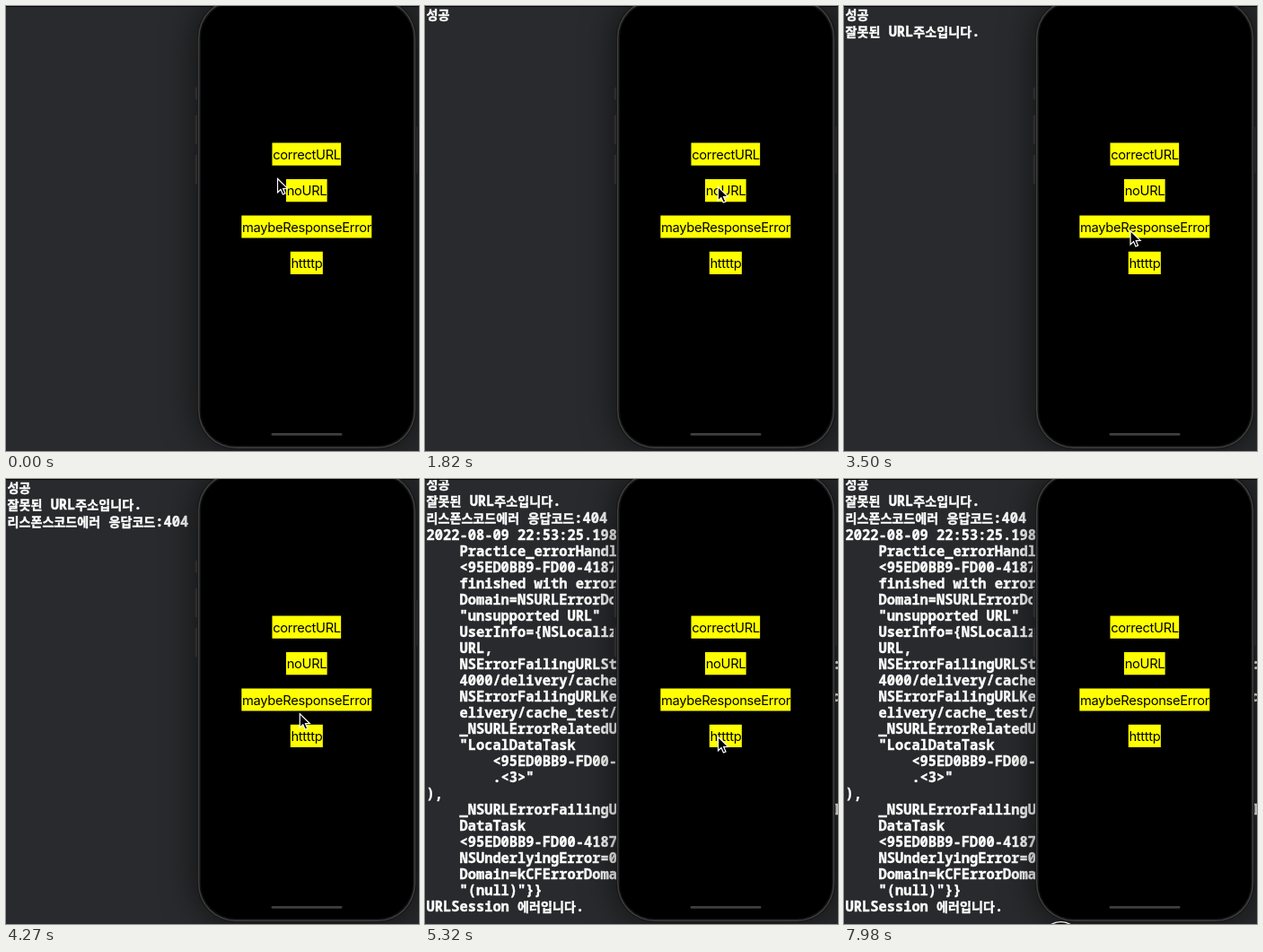
Animation, 460 px wide and 496 px high, one loop 8.12 s. Source, as an HTML page with a canvas:

```html
<!DOCTYPE html>
<html lang="ko">
<head>
<meta charset="utf-8">
<style>
html, body { margin: 0; width: 460px; height: 496px; overflow: hidden; background: #292a2d; }
canvas { display: block; }
</style>
</head>
<body>
<canvas id="stage" width="460" height="496"></canvas>
<script>
const c = document.getElementById('stage').getContext('2d');
const LOOP = 8120, STEP = 70;

const LOG = `2022-08-09 22:53:25.198
    Practice_errorHandling
    <95ED0BB9-FD00-4187-
    finished with error
    Domain=NSURLErrorDomain
    "unsupported URL"
    UserInfo={NSLocalizedDescription=unsupported
    URL,
    NSErrorFailingURLStringKey=httttp://127.0.0.1:
    4000/delivery/cache_test/
    NSErrorFailingURLKey=httttp://127.0.0.1:4000/d
    elivery/cache_test/
    _NSURLErrorRelatedURLSessionTaskErrorKey=(
    "LocalDataTask
        <95ED0BB9-FD00-4187-
        .<3>"
),
    _NSURLErrorFailingURLSessionTaskErrorKey=Local
    DataTask
    <95ED0BB9-FD00-4187-
    NSUnderlyingError=0x6000
    Domain=kCFErrorDomain
    "(null)"}}`;

const LOG_AT = 5250, END_AT = 5320;
const LINES = [
  [840, '성공'],
  [2240, '잘못된 URL주소입니다.'],
  [3780, '리스폰스코드에러 응답코드:404'],
  ...LOG.split('\n').map(text => [LOG_AT, text]),
  [END_AT, 'URLSession 에러입니다.']
];
const LABELS = ['correctURL', 'noURL', 'maybeResponseError', 'httttp'];

// Pointer: where it starts, then each glide to a new resting place
const HOME = { x: 302, y: 192 };
const GLIDES = [
  { from: 0, to: 560, x: 318, y: 167 },
  { from: 1330, to: 1960, x: 327, y: 206 },
  { from: 2520, to: 3640, x: 327, y: 252, sway: 12 },
  { from: 3990, to: 4830, x: 326, y: 287 },
  { from: 6440, to: 7140, x: 281, y: 500 },
  { from: 7140, to: 7840, x: 241, y: 515 }
];
const CLICKS = [[630, 700], [2100, 2170], [3640, 3710], [5040, 5180], [7910, LOOP]];

function pointerAt(t) {
  let { x, y } = HOME;
  for (const g of GLIDES) {
    const u = Math.min(1, Math.max(0, (t - g.from) / (g.to - g.from)));
    const e = u * u * (3 - 2 * u);
    x += (g.x - x) * e + (g.sway || 0) * Math.sin(u * 2 * Math.PI);
    y += (g.y - y) * e;
  }
  return [x, y];
}

function box(x, y, w, h, r, color) {
  c.fillStyle = color;
  c.beginPath();
  c.roundRect(x, y, w, h, r);
  c.fill();
}

// Hangul and Latin runs use separate fonts; the thin stroke adds weight
function logLine(text, y) {
  let x = 1.5;
  for (const run of text.match(/[가-힣]+|[^가-힣]+/g)) {
    c.font = /[가-힣]/.test(run)
      ? 'bold 14.1px "Noto Sans CJK KR", "Noto Sans CJK", sans-serif'
      : 'bold 15.4px "Noto Sans Mono", monospace';
    c.fillText(run, x, y);
    c.strokeText(run, x, y);
    x += c.measureText(run).width;
  }
}

function drawConsole(t) {
  box(0, 0, 460, 496, 0, '#292a2d');
  c.fillStyle = c.strokeStyle = '#fff';
  c.lineWidth = .4;
  c.textAlign = 'left';
  const scroll = t >= END_AT ? 4 : 0;
  LINES.forEach(([start, text], i) => {
    if (t >= start) logLine(text, 14.5 + i * 18 + Math.min(i, 3) - scroll);
  });
  box(0, 0, 460, 1, 0, '#08080a');
}

function drawPhone() {
  const shell = (inset, color) =>
    box(213 + inset, -8 + inset, 244 - 2 * inset, 502 - 2 * inset, 43 - inset, color);
  c.save();
  c.shadowColor = 'rgba(0,0,0,.6)';
  c.shadowBlur = 38;
  shell(0, '#111');
  c.restore();
  for (const [x, y, h] of [[210, 90, 15], [210, 121, 34], [210, 165, 34], [455, 134, 53]]) {
    box(x, y, 4.5, h, 1, '#1b1b1d');
    box(x + .5, y + .5, 3, h - 1, 1, '#2c2c2e');
  }
  shell(0, '#19191a');
  shell(1, '#3e3e3f');
  shell(2.5, '#101010');
  shell(4, '#000');
  box(295.5, 476, 79, 2.8, 1.4, '#3e3e3e');
}

function drawLabels() {
  c.font = '14.7px Inter, sans-serif';
  c.letterSpacing = '-0.3px';
  c.textAlign = 'center';
  LABELS.forEach((text, i) => {
    const w = c.measureText(text).width + 1, y = 152.6 + i * 40.4;
    box(334.8 - w / 2, y, w, 25.2, 0, '#ff0');
    c.fillStyle = '#000';
    c.fillText(text, 335, y + 18.4);
  });
  c.letterSpacing = '0px';
}

function ring(x, y, r, color, width) {
  c.strokeStyle = color;
  c.lineWidth = width;
  c.beginPath();
  c.arc(x, y, r, 0, Math.PI * 2);
  c.stroke();
}

function drawPointer(t) {
  const [x, y] = pointerAt(t);
  if (CLICKS.some(([a, b]) => t >= a && t < b)) {
    ring(x + .5, y + .7, 20, 'rgba(0,0,0,.75)', 4);
    ring(x + .5, y + .7, 22, '#f4f4f4', 1.3);
    ring(x + .5, y + .7, 18, '#f4f4f4', 1.3);
  }
  c.save();
  c.translate(x, y);
  c.fillStyle = '#000';
  c.strokeStyle = '#fff';
  c.lineWidth = 1.2;
  const arrow = new Path2D('M.5 .5V15.8L4 12.6 6.4 18 9 16.9 6.7 11.6 11.6 11.4Z');
  c.fill(arrow);
  c.stroke(arrow);
  c.restore();
}

const begin = performance.now();
function draw(now) {
  const elapsed = Math.max(0, now - begin) % LOOP;
  const t = Math.floor(elapsed / STEP) * STEP;
  drawConsole(t);
  drawPhone();
  drawLabels();
  drawPointer(t);
  requestAnimationFrame(draw);
}
draw(begin);
</script>
</body>
</html>
```
